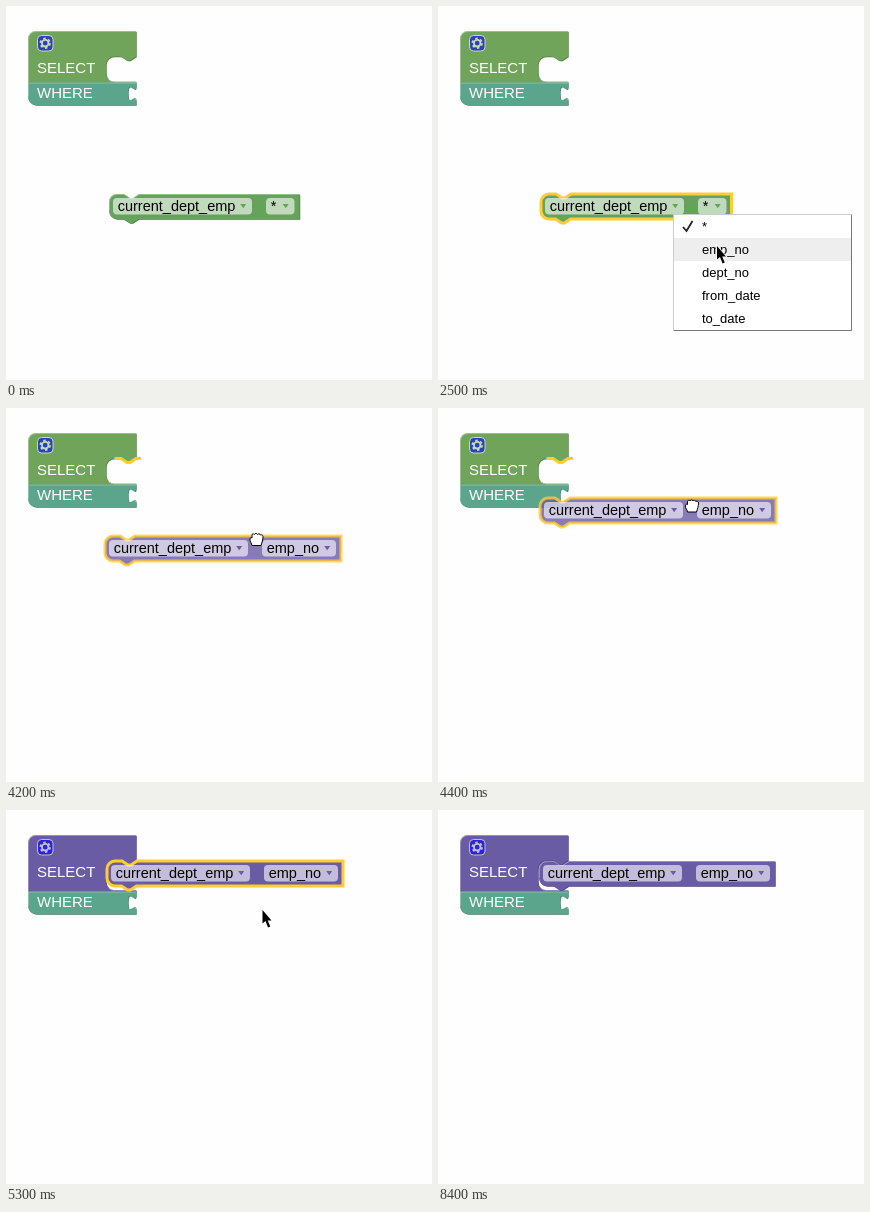
An HTML page that plays this animation: 426 by 374 pixels, repeating every 9.1 s.

```html
<!DOCTYPE html>
<html lang="en">
<head>
<meta charset="utf-8">
<title>Query blocks</title>
<style>
  html, body { margin: 0; width: 100%; height: 100%; overflow: hidden; background: #fefefe; }
  svg { display: block; font-family: "Liberation Sans", Arial, sans-serif; }
  .label { font-size: 15px; fill: #fff; }
  .field { font-size: 14.5px; }
  .item { font-size: 13px; }
</style>
</head>
<body>
<svg id="stage" width="426" height="374" viewBox="0 0 426 374"></svg>
<script>
const LOOP = 9100, STEP = 100;
const GREEN = '#70a45a', TEAL = '#5ba58c', PURPLE = '#6a5ba5', YELLOW = '#fc3';
const COLUMNS = ['*', 'emp_no', 'dept_no', 'from_date', 'to_date'];

// Moments of the story, in ms
const ENTER = 300, HOVER = 1100, SELECT = 1500, OPEN = 1600, LEAVE = 2100, PICK = 2900,
  HAND = 3400, GRAB = 3900, NEAR = 4100, DROP = 5000, OFF = 5100, DESELECT = 6200, EXIT = 8400;

// Keys are [time, x, y]
const POINTER = [
  [300, 409, 111], [500, 395, 155], [700, 365, 178], [900, 310, 195], [1100, 272, 203],
  [2000, 272, 203], [2100, 269, 207], [2300, 265, 214], [2500, 279, 240], [3100, 279, 240],
  [3500, 260, 215], [3700, 254, 208], [3800, 254, 208], [4000, 251, 190], [4100, 249, 160],
  [4200, 250.5, 131.5], [4400, 254, 98], [4700, 257, 78], [4900, 257, 77], [5700, 256, 123],
  [5800, 256, 123], [5900, 256, 125], [6100, 256, 125], [6300, 256, 131.5], [6400, 256, 131.5],
  [6500, 256, 133], [6600, 256, 138], [6700, 256, 138], [7600, 239, 189], [7800, 239, 189],
  [8100, 290, 193], [8300, 374, 182]
];
const DRAG = [
  [3900, 103, 188], [4000, 100, 176], [4100, 97, 152], [4200, 99, 128], [4400, 102, 90],
  [4600, 106, 64], [4700, 104, 60], [4900, 103, 59]
];

const ARROW = 'M0 0V13.5L3 11 5.5 17.5 7.8 16.5 5.2 10.5H9Z';
const OPEN_HAND = 'M5 16.5C4 13 1 11 .5 9 .5 7.5 2 7.5 3.5 9L2 4C2 2.5 3.7 2.4 4.2 4L5.5 7 5.3 2C5.3.5 7.2.5 7.4 2L8 7 8.8 2C9 .7 10.8.8 10.7 2.4L10.5 7.5 12 4C12.5 2.7 14.6 3.2 14.3 4.6 13.5 8 14 10 12 13L11.5 16.5Z';
const FIST = 'M3 13.5C3 11 .5 10 1 7 1 5.5 2.5 5.5 3 6V3C3 1.5 5 1.5 5.5 2.5 6 1 8 1 8.5 2.5 9 1.5 11 1.5 11.3 3 12.5 2.3 14 3 14 4.5 14 8 13 10 12 13.5Z';

function along(keys, t) {
  const i = keys.findIndex(k => k[0] > t);
  if (i < 0) return keys[keys.length - 1].slice(1);
  if (i === 0) return keys[0].slice(1);
  const [a, b] = [keys[i - 1], keys[i]], f = (t - a[0]) / (b[0] - a[0]);
  return [a[1] + (b[1] - a[1]) * f, a[2] + (b[2] - a[2]) * f];
}

const at = (x, y, body) => `<g transform="translate(${x} ${y})">${body}</g>`;
const text = (x, y, kind, s) => `<text x="${x}" y="${y}" class="${kind}">${s}</text>`;
const path = (d, style) => `<path d="${d}" ${style}/>`;

// Filled body with a darker lower-right edge and a lighter upper-left line
const bevel = (d, color, light) =>
  path(d, `transform="translate(.7 .7)" fill="${color}"`) +
  path(d, 'transform="translate(.7 .7)" fill="#000" fill-opacity=".22"') +
  path(d, `fill="${color}"`) +
  path(light, 'fill="none" stroke="#fff" stroke-opacity=".3"');

const gear = () => at(31, 29, `<g opacity=".6" stroke="#fff" fill="none">
  <rect x=".5" y=".5" width="15.5" height="15.5" rx="4" fill="#00f"/>
  <circle cx="8.2" cy="8.2" r="3.3" stroke-width="1.8"/>
  <circle cx="8.2" cy="8.2" r="4.8" stroke-width="1.8" stroke-dasharray="2.5 2.527"/></g>`);

function query(joined) {
  const gap = joined ? 29.5 : 25, foot = joined ? 81.5 : 76.5;
  const inlet = `l-6 4h-3l-6-4H86a8 8 0 0 0-8 8v${gap - 16}a8 8 0 0 0 8 8H108`;
  const top = `M0 8A8 8 0 0 1 8 0H108V25.5${inlet}V${foot - 25}H0Z`;
  const tab = 'c0 10-8-8-8 7.5s8-2.5 8 7.5';
  return at(22, 25, bevel(top, joined ? PURPLE : GREEN,
      `M.5 ${foot - 25}V8A7.5 7.5 0 0 1 8 .5H108M80.5 ${23.5 + gap}A8 8 0 0 0 86 ${26 + gap}H108`)) +
    at(22, foot, bevel(`M0 0H108v3.5${tab}V22.5H8a8 8 0 0 1-8-8Z`, TEAL,
      'M.5 14V.5H108M102 17Q108 14 108 18')) +
    gear() + text(31, 67, 'label', 'SELECT') + text(31, foot + 15.5, 'label', 'WHERE');
}

function field(x, width, value, color, hover) {
  return `<rect x="${x}" y="4" width="${width}" height="16.5" rx="4" fill="#fff" fill-opacity=".6"
    ${hover ? 'stroke="#fff" stroke-width="2"' : ''}/>` +
    text(x + 4.7, 17, 'field', value) +
    path(`M${x + width - 11.8} 10h6l-3 4.2Z`, `fill="${color}"`);
}

function column([x, y], t) {
  const picked = t >= PICK, dragged = t >= GRAB && t < DROP;
  const color = picked ? PURPLE : '#65a35a', width = picked ? 236 : 190.5;
  const d = `M0 8A8 8 0 0 1 8 0H15l6 4h3l6-4H${width}V25H29.5l-6 4h-3l-6-4H8a8 8 0 0 1-8-8Z`;
  const body = t >= SELECT && t < DESELECT
    ? path(d, `fill="${color}" stroke="${YELLOW}" stroke-width="3" ${dragged ? 'fill-opacity=".8" stroke-opacity=".8"' : ''}`)
    : bevel(d, color, `M.5 17V8A7.5 7.5 0 0 1 8 .5H15l6 4h3l6-4H${width}`);
  return at(x, y, body + field(4, 139, 'current_dept_emp', color) +
    field(157, picked ? 74 : 28.5, picked ? 'emp_no' : '*', color, t >= HOVER && t < LEAVE));
}

function menu(pointerY) {
  const row = pointerY >= 232 ? 1 : 0;
  return '<rect x="235.5" y="208.5" width="178" height="116" fill="#fff" stroke="#ccc"/>' +
    path('M236 324.5H413.5V209', 'fill="none" stroke="#777"') +
    `<rect x="236" y="${209 + 23 * row}" width="177" height="23" fill="#eee"/>` +
    path('M245 221l3.5 4 6-10', 'fill="none" stroke="#222" stroke-width="1.8"') +
    COLUMNS.map((name, i) => text(264, 225 + 23 * i, 'item', name)).join('');
}

function pointer([x, y], t) {
  if (t < ENTER || t >= EXIT) return '';
  if (t >= GRAB && t < DROP) return at(x - 7.5, y - 7.5, path(FIST, 'fill="#fff" stroke="#000"'));
  if (t >= HAND && t <= OFF) return at(x - 8, y - 8, path(OPEN_HAND, 'fill="#fff" stroke="#000"'));
  return at(x, y, path(ARROW, 'stroke="#fff" stroke-width="1.6" paint-order="stroke"'));
}

function scene(t) {
  const joined = t >= DROP, tip = along(POINTER, t);
  const marker = t >= NEAR && !joined
    ? path('M108.5 50.5H115l6 4h3l6-4h5', `fill="none" stroke="${YELLOW}" stroke-width="3"`) : '';
  return query(joined) + marker +
    column(joined ? [101, 51] : along(DRAG, t), t) +
    (t >= OPEN && t < PICK ? menu(tip[1]) : '') +
    pointer(tip, t);
}

const stage = document.getElementById('stage');
let shown = -1;
function tick() {
  const t = Math.floor(performance.now() % LOOP / STEP) * STEP;
  if (t !== shown) stage.innerHTML = scene(shown = t);
  requestAnimationFrame(tick);
}
tick();
</script>
</body>
</html>
```
